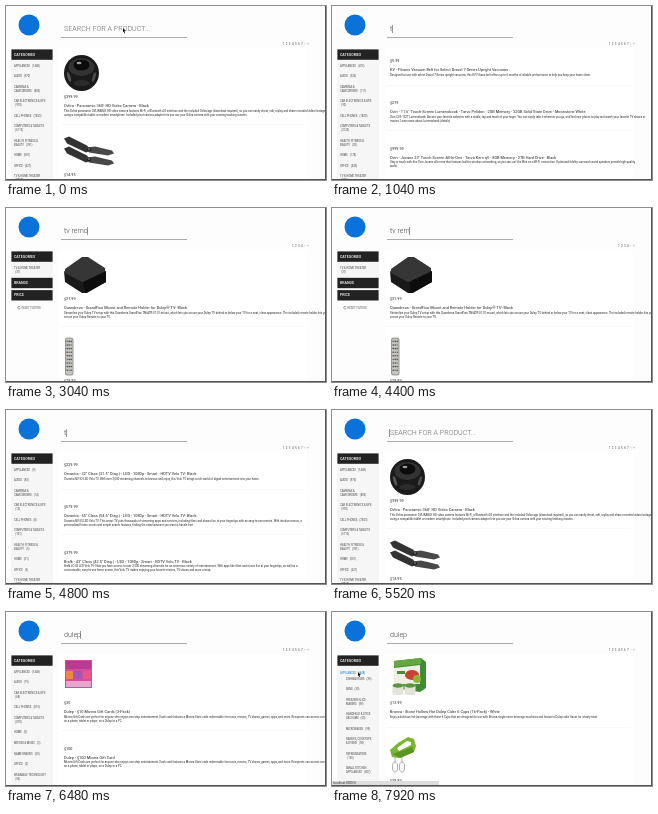
An HTML page with a canvas for the animation above (8000 ms loop, 320 px wide and 174 px high).

```html
<!DOCTYPE html>
<html lang="en">
<head>
<meta charset="utf-8">
<title>Product search</title>
<style>
  html, body { margin: 0; width: 100%; height: 100%; overflow: hidden; background: #fdfdfd; }
  canvas { display: block; }
</style>
</head>
<body>
<canvas id="stage" width="320" height="174"></canvas>
<script>
const ctx = document.getElementById('stage').getContext('2d');
const LOOP = 8000, STEP = 80, BLUE = '#0b72d9', DARK = '#222';

function setFont(size, weight) {
  ctx.font = `${weight} ${size * 10}px Roboto, sans-serif`;
}

// Small type is laid out at ten times its size, so that advances stay exact.
function text(str, x, y, size, color = DARK, weight = 400, align = 'left') {
  ctx.save();
  ctx.scale(0.1, 0.1);
  setFont(size, weight);
  ctx.textBaseline = 'middle';
  ctx.textAlign = align;
  ctx.fillStyle = color;
  ctx.fillText(str, x * 10, y * 10);
  ctx.restore();
}

function widthOf(str, size, weight) {
  setFont(size, weight);
  return ctx.measureText(str).width / 10;
}

function rect(x, y, w, h, color) {
  ctx.fillStyle = color;
  ctx.fillRect(x, y, w, h);
}

function oval(x, y, rx, ry, color, turn = 0) {
  ctx.fillStyle = color;
  ctx.beginPath();
  ctx.ellipse(x, y, rx, ry, turn, 0, Math.PI * 2);
  ctx.fill();
}

function poly(color, ...points) {
  ctx.fillStyle = color;
  ctx.beginPath();
  for (let i = 0; i < points.length; i += 2) ctx.lineTo(points[i], points[i + 1]);
  ctx.closePath();
  ctx.fill();
}

function rounded(x, y, w, h, r, color) {
  ctx.fillStyle = color;
  ctx.beginPath();
  ctx.roundRect(x, y, w, h, r);
  ctx.fill();
}

function propeller() {
  poly('#333', 0, 3, 5, 1, 23, 10, 27, 15, 22, 17, 3, 8);
  poly('#484848', 22, 12, 31, 11, 48, 15, 50, 18, 44, 20, 25, 17);
  oval(25, 14, 2.2, 2, '#222');
  oval(25, 13.6, 0.8, 0.8, '#aaa');
}

const pics = {
  ball() {
    oval(17.5, 19, 17.5, 18, '#1a1a1a');
    oval(17.5, 13, 13, 9, '#333');
    oval(17.5, 11, 8, 5.5, '#0c0c0c');
    oval(15, 9, 2.5, 1.3, '#999');
    oval(5, 23, 1.5, 5, '#555', -0.3);
    oval(30, 23, 1.5, 5, '#4a4a4a', 0.3);
    oval(17.5, 29, 8, 3, '#2b2b2b');
  },
  blades() {
    propeller();
    ctx.translate(0, 10);
    propeller();
  },
  belt() {
    oval(14, 18, 13, 17, '#333');
    oval(14, 18, 10, 14, '#fff');
  },
  laptop() {
    rect(3, 3, 38, 22, '#bbb');
    rect(5, 5, 34, 18, '#4c7fa8');
    poly('#ccc', 3, 25, 41, 25, 45, 32, -1, 32);
  },
  tv() {
    rect(0, 3, 50, 28, '#161616');
    const glow = ctx.createLinearGradient(0, 4, 50, 30);
    glow.addColorStop(0, '#35558c');
    glow.addColorStop(1, '#7a4c83');
    rect(1.5, 4.5, 47, 24.5, glow);
    rect(9, 31, 2, 3, '#222');
    rect(39, 31, 2, 3, '#222');
  },
  box() {
    poly('#191919', 0, 15, 21, 25, 42, 15, 42, 26, 23, 37, 18, 37, 1, 26);
    poly('#363636', 1, 13, 18, 1, 24, 1, 41, 12, 41, 16, 24, 26, 18, 26, 1, 17);
    poly('#0d0d0d', 19, 26, 42, 15, 42, 26, 21, 37);
  },
  remote() {
    rounded(1, 0, 8.5, 38, 2.5, '#999');
    rounded(2, 1, 6.5, 36, 2, '#c4c4c0');
    for (let i = 0; i < 27; i++) {
      oval(3.2 + (i % 3) * 2, 4 + Math.floor(i / 3) * 3.6, 0.75, 0.8, i % 5 ? '#444' : '#985f43');
    }
  },
  cards() {
    rect(1, 0, 27, 28, '#cf4f9b');
    rect(2, 1, 25, 8, '#b93a91');
    rect(2, 11, 7, 8, '#ef873d');
    rect(10, 11, 8, 8, '#a955b6');
    rect(19, 11, 8, 8, '#e65687');
    rect(2, 21, 25, 6, '#e7a6cc');
  },
  card() {
    rect(1, 0, 25, 33, '#e55a91');
    oval(13, 14, 8, 8, '#ef9a64');
  },
  cider() {
    poly('#3f8a35', 4, 1, 31, -2, 36, 2, 36, 28, 30, 32, 4, 28);
    poly('#63a93f', 4, 1, 31, -2, 31, 4, 4, 7);
    poly('#f0efe4', 4, 8, 30, 5, 30, 24, 4, 24);
    oval(22, 15, 7, 5, '#c9432f');
    oval(27, 19, 4, 4, '#8cb53b');
    rect(7, 11, 8, 3, '#4b8b3b');
    for (const x of [8, 20]) {
      rounded(x - 5.5, 24, 11, 11, 2, '#e4e3d8');
      oval(x, 25.5, 5.5, 2.2, '#5c9440');
    }
  },
  mixer() {
    poly('#76b82e', 0, 12, 8, 5, 18, -1, 24, 1, 26, 8, 24, 14, 10, 20, 2, 19);
    poly('#fff', 7, 10, 17, 3, 21, 4, 21, 7, 9, 13);
    poly('#5b9423', 3, 16, 22, 9, 24, 14, 10, 20);
    ctx.strokeStyle = '#999';
    ctx.lineWidth = 0.8;
    for (const x of [5, 12]) {
      ctx.beginPath();
      ctx.moveTo(x, 19);
      ctx.lineTo(x, 24);
      ctx.ellipse(x, 29, 2.6, 5, 0, -Math.PI / 2, Math.PI * 1.5);
      ctx.stroke();
    }
  }
};

const card = (pic, price, title, lines, grow = 36) => ({ pic, price, title, lines, grow });

const orvantia = (size, diag, price, lines) => card('tv', price,
  `Orvantia - ${size}" Class (${diag}" Diag.) - LED - 1080p - Smart - HDTV Velu TV- Black`, lines);

const tvCards = [
  orvantia(32, 31.5, '$229.99', ['Orvantia NV-32 LED Velu TV: With over 2,000 streaming channels to browse and enjoy, this Velu TV brings a rich world of digital entertainment into your home.']),
  orvantia(55, 54.6, '$579.99', [
    'Orvantia NV-55 LED Velu TV: This smart TV puts thousands of streaming apps and services, including films and shows live, at your fingertips with an easy-to-use remote. With intuitive menus, a',
    'personalized home screen and simple search features, finding the entertainment you want is hassle-free.']),
  card('tv', '$379.99', 'Brelk - 43" Class (42.5" Diag.) - LED - 1080p - Smart - HDTV Velu TV - Black', [
    'Brelk LC-43 LED Velu TV: Now you have access to over 2,000 streaming channels for an enormous variety of entertainment. With apps like films and music live at your fingertips, as well as a',
    'customizable, easy-to-use home screen, this Velu TV makes enjoying your favorite movies, TV shows and more a snap.'])
];

const counted = (names, counts) => names.map((name, i) => `${name}  (${counts[i]})`);
const departments = ['APPLIANCES ', 'AUDIO ', 'CAMERAS &|CAMCORDERS ', 'CAR ELECTRONICS & GPS|',
  'CELL PHONES ', 'COMPUTERS & TABLETS|', 'HEALTH, FITNESS &|BEAUTY ', 'HOME ', 'OFFICE ', 'TV & HOME THEATER|'];

const views = {
  home: {
    side: counted(departments, [1448, 970, 803, 970, 7483, 6112, 391, 581, 621, 2010]),
    pages: 7,
    cards: [
      card('ball', '$399.99', 'Ovlira - Panoramic 360° HD Video Camera - Black', [
        'This Ovlira panoramic OVLIRABLK HD video camera features Wi-Fi, a Bluetooth 4.0 interface and the included Ovlira app (download required), so you can easily shoot, edit, replay and share recorded video footage',
        'using a compatible tablet or modern smartphone. Included pivot camera adapter lets you use your Ovlira camera with your existing tracking mounts.']),
      card('blades', '$14.95', 'Ovlira - Spare Propellers (4-Pack) - Black', ['Keep your drone in the air with this set of spare propellers.'], 32)
    ]
  },
  belts: {
    side: counted(departments, [473, 536, 111, 92, 1800, 2122, 20, 178, 430, 940]),
    pages: 7,
    cards: [
      card('belt', '$5.99', 'KV - Filvane Vacuum Belt for Select Dravel 7-Series Upright Vacuums',
        ['Designed for use with select Dravel 7-Series upright vacuums, this KV Filvane belt offers up to 6 months of reliable performance to help you keep your home clean.']),
      card('laptop', '$279', 'Ovin - 11.6" Touch-Screen Lumenobook - Tarvo Pelidon - 2GB Memory - 32GB Solid State Drive - Moonstone White', [
        'Ovin CV5-132T Lumenobook: Access your favorite websites with a stable, tap and touch of your finger. You can easily take it wherever you go, and find new places to play and watch your favorite TV shows or',
        'movies. Learn more about Lumenobook (details)']),
      card('laptop', '$999.99', 'Ovin - Jovane 23" Touch-Screen All-In-One - Tarvo Kern q5 - 8GB Memory - 2TB Hard Drive - Black', [
        'Stay in touch with this Ovin Jovane all-in-one that features built-in wireless networking, so you can surf the Web on a Wi-Fi connection. Optimized fidelity surround sound speakers provide high-quality',
        'audio.'])
    ]
  },
  tv: {
    side: counted(departments, [9, 83, 14, 12, 8, 101, 5, 31, 3, 940]),
    pages: 7,
    cards: tvCards
  },
  tvRemotes: {
    side: counted(['BATTERIES & POWER ', 'COMPUTERS & TABLETS|', 'HOME ', 'VERIDALE HOME|THEATER ', 'TV & HOME THEATER|'], [9, 1, 3, 5, 194]),
    pages: 7,
    filters: true,
    cards: tvCards
  },
  mounts: {
    side: counted(['TV & HOME THEATER|'], [31]),
    pages: 4,
    filters: true,
    cards: [
      card('box', '$31.99', 'Quandreva - GrandFixo Mount and Remote Holder for Dulep® TV- Black', [
        'Streamline your Dulep TV setup with this Quandreva GrandFixo TM-ATR-01.01 mount, which lets you secure your Dulep TV behind or below your TV for a neat, clean appearance. The included remote holder lets you',
        'secure your Dulep Remote to your TV.']),
      card('remote', '$29.99', 'Quandreva - Universal Remote - Silver', ['Control your devices with one remote.'], 36.5)
    ]
  },
  gifts: {
    side: counted(['APPLIANCES ', 'AUDIO ', 'CAR ELECTRONICS & GPS|', 'CELL PHONES ', 'COMPUTERS & TABLETS|', 'HOME ',
      'MOVIES & MUSIC ', 'NAME BRANDS ', 'OFFICE ', 'WEARABLE TECHNOLOGY|'], [1448, 19, 68, 875, 870, 3, 3, 50, 2, 56]),
    pages: 7,
    cards: [
      card('cards', '$30', 'Dulep - $10 Mivora Gift Cards (3-Pack)', [
        'Mivora Gift Cards are perfect for anyone who enjoys one-stop entertainment. Each card features a Mivora Store code redeemable for music, movies, TV shows, games, apps, and more. Recipients can access content',
        'on a phone, tablet or player, on a Dulep or a PC.']),
      card('card', '$100', 'Dulep - $100 Mivora Gift Card', [
        'Mivora Gift Cards are perfect for anyone who enjoys one-stop entertainment. Each card features a Mivora Store code redeemable for music, movies, TV shows, games, apps, and more. Recipients can access content',
        'on a phone, tablet or player, on a Dulep or a PC.'])
    ]
  },
  kitchen: {
    side: counted(['DISHWASHERS ', 'FANS ', 'FREEZERS & ICE|MAKERS ', 'HANDHELD & STICK|VACUUMS ', 'MICROWAVES ',
      'RANGES, COOKTOPS|& OVENS ', 'REFRIGERATORS|', 'SMALL KITCHEN|APPLIANCES ', 'VACUUMS & FLOOR|CARE '],
      [35, 30, 99, 50, 99, 98, 136, 507, 88]),
    parent: 'APPLIANCES  (1448)',
    pages: 7,
    cards: [
      card('cider', '$13.99', 'Brunva - Stone Hollow Hot Dulep Cider 6 Cups (16-Pack) - White',
        ['Enjoy a delicious hot beverage with these 6 Cups that are designed for use with Brunva single-serve beverage machines and feature a Dulep cider flavor for a tasty treat.']),
      card('mixer', '$39.99', 'Brunva - 5-Speed Hand Mixer - Green', ['Mix your ingredients with ease.'])
    ]
  }
};

// Each row: start time, query, view, pictures loaded, caret shown.
const states = [
  [0, '', 'home', 2, false],
  [160, '', 'home', 2, true],
  [400, '', 'home', 2, false],
  [480, '', 'home', 2, true],
  [800, 't', 'home', 2, true],
  [1040, 't', 'belts', 0, true],
  [1120, 't', 'belts', 1, true],
  [1200, 't', 'belts', 2, true],
  [1440, 'tv', 'belts', 2, true],
  [1520, 'tv', 'tv', 0, true],
  [1600, 'tv', 'tv', 1, true],
  [1680, 'tv', 'tv', 2, true],
  [1840, 'tv ', 'tv', 2, true],
  [1920, 'tv r', 'tv', 2, true],
  [2080, 'tv re', 'tvRemotes', 0, true],
  [2160, 'tv re', 'tvRemotes', 1, true],
  [2240, 'tv re', 'tvRemotes', 2, true],
  [2400, 'tv rem', 'tvRemotes', 2, true],
  [2560, 'tv rem', 'mounts', 0, true],
  [2640, 'tv rem', 'mounts', 1, true],
  [2720, 'tv rem', 'mounts', 2, true],
  [2960, 'tv remo', 'mounts', 2, true],
  [3120, 'tv remot', 'mounts', 2, true],
  [3440, 'tv remote', 'mounts', 2, true],
  [3840, 'tv remote', 'mounts', 2, false],
  [4080, 'tv remote', 'mounts', 2, true],
  [4160, 'tv remot', 'mounts', 2, true],
  [4240, 'tv remo', 'mounts', 2, true],
  [4320, 'tv rem', 'mounts', 2, true],
  [4560, 'tv re', 'mounts', 2, true],
  [4640, 'tv r', 'tvRemotes', 0, true],
  [4720, 'tv', 'tvRemotes', 2, true],
  [4800, 't', 'tv', 0, true],
  [4880, '', 'tv', 2, true],
  [5040, '', 'home', 0, true],
  [5120, '', 'home', 1, true],
  [5200, '', 'home', 2, true],
  [5600, 'd', 'home', 2, true],
  [5680, 'du', 'home', 2, true],
  [5840, 'dul', 'belts', 0, true],
  [5920, 'dul', 'belts', 2, true],
  [6000, 'dule', 'belts', 2, true],
  [6160, 'dulep', 'belts', 2, true],
  [6240, 'dulep', 'gifts', 0, true],
  [6480, 'dulep', 'gifts', 1, true],
  [6560, 'dulep', 'gifts', 2, true],
  [7200, 'dulep', 'gifts', 2, false],
  [7360, 'dulep', 'kitchen', 0, false],
  [7920, 'dulep', 'kitchen', 2, false]
];

function drawSearch(query, caret) {
  const size = 7.1;
  oval(23, 19, 10.5, 10.5, BLUE);
  text(query || 'SEARCH FOR A PRODUCT...', 58, 23.3, size, query ? '#444' : '#666', 300);
  if (caret) rect(Math.round(57.3 + widthOf(query, size, 300)), 19, 0.6, 8, '#555');
  rect(55, 31, 126, 0.7, '#888');
}

function drawPages(count) {
  const marks = [...Array.from({ length: count }, (_, i) => i + 1), '›', '»'];
  marks.forEach((mark, i) => text(mark, 302 - (marks.length - 1 - i) * 3.05, 38, 3, '#444', 400, 'center'));
}

function header(label, y) {
  rect(5.4, y + 0.4, 41.2, 10.4, DARK);
  text(label, 8, y + 5.7, 3.6, '#fff', 500);
}

const itemHeight = item => /\|/.test(item) ? 14.4 : 10.6;

function drawSide({ side, parent, filters }, hover) {
  const x = parent ? 14 : 8;
  let y = parent ? 67 : 60;
  const end = side.reduce((sum, item) => sum + itemHeight(item), y);

  rect(5, 54, 42, filters ? end - 59 : 120, '#f6f6f6');
  header('CATEGORIES', 43);
  if (parent) text(parent, 8, 61, 2.7, BLUE);
  side.forEach((item, i) => {
    const color = hover && i === 0 ? BLUE : '#444';
    item.split('|').forEach((line, n) => text(line, x, y + n * 3.8, 2.7, color));
    y += itemHeight(item);
  });
  if (!filters) return;
  header('BRANDS', end - 5);
  header('PRICE', end + 7.3);
  ctx.strokeStyle = '#555';
  ctx.lineWidth = 0.6;
  ctx.beginPath();
  ctx.arc(13, end + 25.3, 1.3, 0.4, 5.6);
  ctx.stroke();
  text('RESET FILTERS', 15.5, end + 25.3, 2.8, '#555');
}

function drawCards(cards, loaded) {
  let y = 55;
  cards.forEach((item, i) => {
    if (i) rect(55, y - 18, 244, 0.5, '#f0f0f0');
    if (i < loaded) {
      ctx.save();
      ctx.translate(58, y - 7);
      pics[item.pic]();
      ctx.restore();
      y += item.grow;
    }
    text(item.price, 58, y, 3.75);
    text(item.title, 58, y + 9, 3.9);
    item.lines.forEach((line, n) => text(line, 58, y + 14.2 + n * 3.7, 2.8));
    y += 38.6 + 3.4 * item.lines.length;
  });
}

function drawPointer(x, y) {
  ctx.save();
  ctx.translate(x, y);
  poly('#fff', -0.6, -1, 4, 3.6, 2, 3.9, 2.9, 6, 1.5, 6.4, 0.8, 4.4, -0.6, 5.4);
  poly('#111', 0, 0, 3, 3, 1.5, 3.2, 2.3, 5.2, 1.6, 5.5, 0.8, 3.6, 0, 4.3);
  ctx.restore();
}

function render(time) {
  const t = Math.floor((time % LOOP) / STEP) * STEP;
  const [, query, name, loaded, caret] = states.findLast(state => state[0] <= t);
  const view = views[name];
  const hover = t >= 7040;

  rect(0, 0, 320, 174, '#fdfdfd');
  rect(53, 42, 248, 132, '#fff');
  drawSearch(query, caret);
  drawPages(view.pages);
  drawSide(view, hover && !view.parent);
  drawCards(view.cards, loaded);

  if (t < 160) drawPointer(117, 22);
  if (t >= 6640) {
    const p = Math.min(1, (t - 6640) / 480);
    const ease = p * p * (3 - 2 * p);
    drawPointer(117 - 91 * ease, 24 + 36 * ease);
  }
  if (hover) {
    rect(0, 169, 107, 5, '#ddd');
    text('localhost:8000/#', 1, 171.6, 3, '#333');
  }
  rect(319, 0, 1, 174, '#555');
  rect(0, 173, 320, 1, '#555');
}

const start = performance.now();
function tick() {
  render(performance.now() - start);
  requestAnimationFrame(tick);
}
tick();
</script>
</body>
</html>
```
